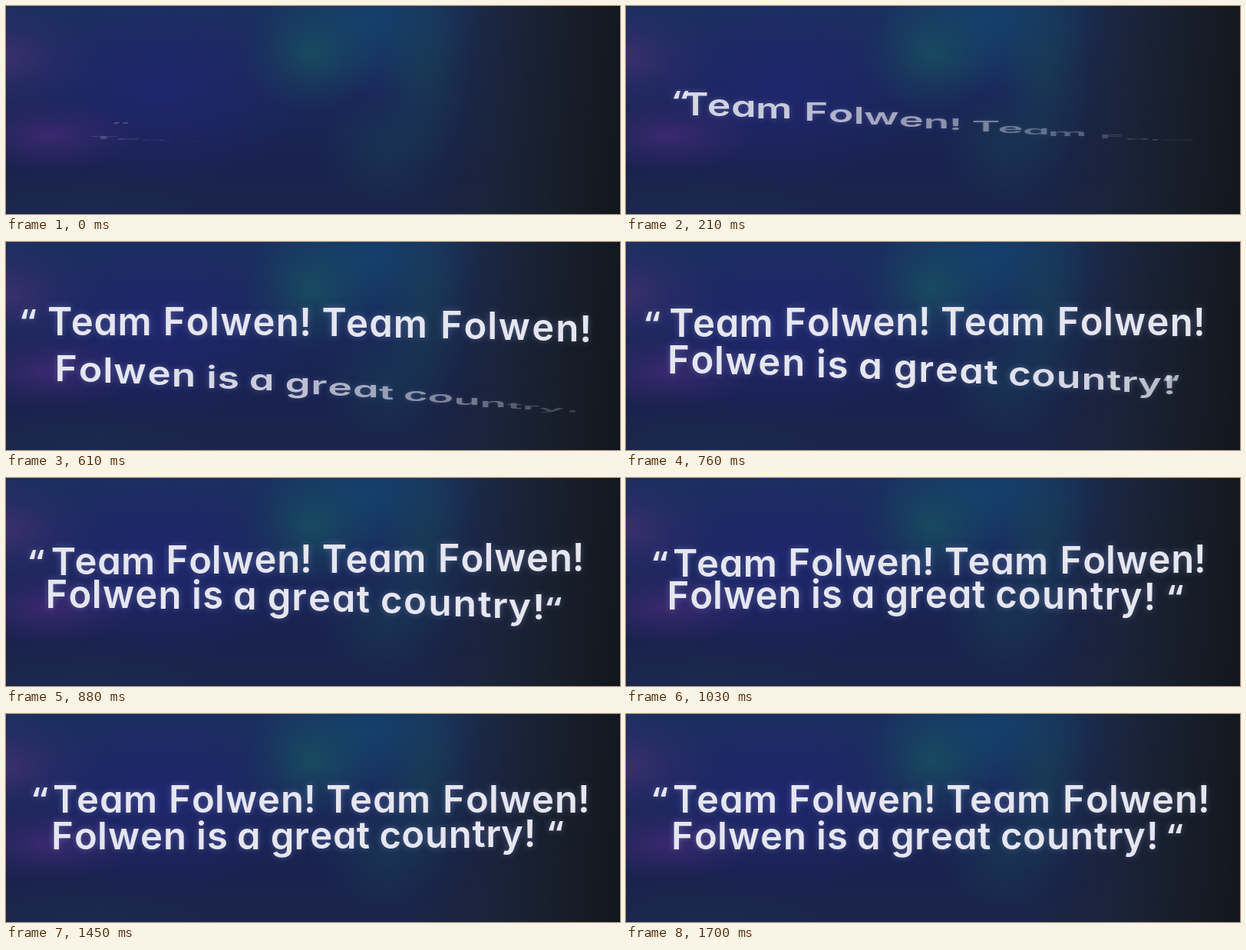
Write an HTML page that moves like this. It is 800 px wide and 272 px high and loops after 1.73 s.

```html
<!DOCTYPE html>
<html lang="en">
<head>
<meta charset="utf-8">
<title>Quote</title>
<style>
  html, body { margin: 0; width: 100%; height: 100%; overflow: hidden; background: #161b2b; }
  #stage {
    position: relative; width: 800px; height: 272px; overflow: hidden;
    background:
      radial-gradient(ellipse 115px 48px at 55px 170px, rgba(78,42,126,.62), rgba(74,42,124,.3) 50%, transparent),
      radial-gradient(ellipse 130px 75px at -5px 68px, rgba(78,50,122,.66), rgba(64,46,118,.28) 50%, transparent),
      radial-gradient(ellipse 90px 80px at 398px 62px, rgba(24,84,94,.7), rgba(24,78,94,.3) 55%, transparent),
      radial-gradient(ellipse 60px 130px at 545px 85px, rgba(24,64,82,.65), transparent),
      radial-gradient(ellipse 85px 75px at 495px 185px, rgba(24,64,82,.55), transparent),
      radial-gradient(ellipse 145px 95px at 475px 20px, rgba(18,70,112,.75), transparent),
      radial-gradient(ellipse 190px 130px at 200px 110px, rgba(34,37,116,.7), transparent),
      radial-gradient(ellipse 190px 60px at 110px 272px, rgba(28,46,80,.5), transparent),
      linear-gradient(94deg, transparent 65%, rgba(26,36,56,.85) 79%, #171d28 91%, #13161d 100%),
      linear-gradient(#1b2f60, #1a2759 45%, #19224f 75%, #1b2549);
  }
  .word {
    position: absolute; height: 60px; white-space: nowrap;
    font: 560 49px/60px Inter, "Open Sans", sans-serif;
    font-feature-settings: "cv11"; letter-spacing: .8px; color: #e5e6f0;
    text-shadow: 0 0 9px rgba(185,195,255,.32);
  }
  .word.mark { font-family: "Open Sans", "Noto Sans", sans-serif; font-weight: 600; }
  .word span { display: inline-block; transform-origin: 50% 48px; }
  .word .tuck { margin-right: -2px; }
  .word.mark span { transform-origin: 50% 25px; }
</style>
</head>
<body>
<div id="stage"></div>
<script>
const LOOP = 1730, FLAT = 47.5;
const stage = document.getElementById('stage');

// start: moment the letter at x = 62 first reaches its place; lag: ms per px
const lines = [
  { base: 130, start: 360, lag: 0.41, words: [
    ['“', 35, 2.2], ['Team', 61], ['Folwen!', 212], ['Team', 417], ['Folwen!', 569]] },
  { base: 178, start: 670, lag: 0.5, words: [
    ['Folwen', 59], ['is', 248], ['a', 301], ['great', 345], ['country!', 488], ['“', 706, -0.2]] }
];

// [ms from arrival, distance from the resting place]
const path = [
  [-400, 47.5], [-360, 44], [-255, 28], [-185, 17.5], [-110, 9.5], [-35, 2.8],
  [30, -2.4], [115, -5.8], [200, -7.4], [260, -7], [400, -4.8], [550, -1.8], [680, 0]
];

function offset(t) {
  const last = path.length - 1;
  if (t <= path[0][0]) return FLAT;
  if (t >= path[last][0]) return 0;
  const i = path.findIndex(p => p[0] > t) - 1;
  const [t0, a] = path[i], [t1, b] = path[i + 1], h = t1 - t0;
  const slope = k => {
    const p = path[Math.max(k - 1, 0)], q = path[Math.min(k + 1, last)];
    return k === last ? 0 : (q[1] - p[1]) / (q[0] - p[0]);
  };
  const u = (t - t0) / h, u2 = u * u, u3 = u2 * u;
  return a * (2 * u3 - 3 * u2 + 1) + b * (3 * u2 - 2 * u3)
    + h * (slope(i) * (u3 - 2 * u2 + u) + slope(i + 1) * (u3 - u2));
}

const letters = [];
for (const { base, start, lag, words } of lines) {
  for (const [text, x, drift] of words) {
    const word = document.createElement('div');
    word.className = drift ? 'word mark' : 'word';
    word.style.left = x + 'px';
    word.style.top = base - 48 + 'px';
    for (const ch of text) {
      const el = document.createElement('span');
      el.textContent = ch;
      if (ch === 'T') el.className = 'tuck';
      word.append(el);
    }
    stage.append(word);
    for (const el of word.children) {
      letters.push({
        el, fx: drift || 1, fy: drift ? 1.1 : 1,
        arrive: start + lag * (x + el.offsetLeft - 62)
      });
    }
  }
}

function draw(t) {
  for (const { el, fx, fy, arrive } of letters) {
    const d = offset(t - arrive);
    const fall = Math.min(1, Math.max(0, d / FLAT));
    const dx = d * fx * (1 + 0.2 * fall ** 4);
    const tall = d > 0 ? 1 - fall ** 1.4 : 1 - d * 0.006;
    const wide = 1 + 0.2 * fall;
    el.style.transform =
      `translate(${dx.toFixed(2)}px, ${(d * fy).toFixed(2)}px) scale(${wide.toFixed(3)}, ${tall.toFixed(3)})`;
    el.style.opacity = fall >= 1 ? 0 : Math.min(1, tall + 0.1);
  }
}

const begin = performance.now();
function tick() {
  draw((performance.now() - begin) % LOOP);
  requestAnimationFrame(tick);
}
draw(0);
requestAnimationFrame(tick);
</script>
</body>
</html>
```
